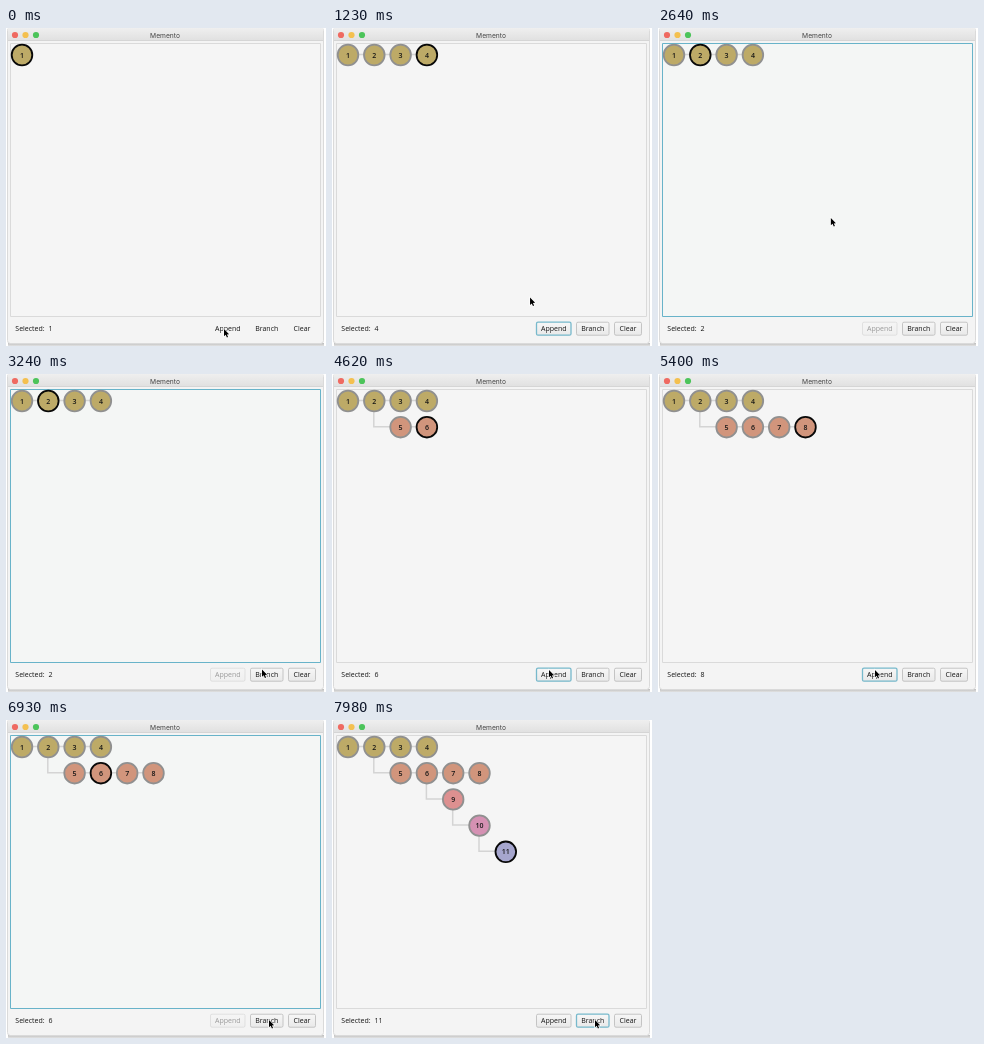
Animation of 320x318 px, one loop 8 s. Source, as an HTML page with a canvas:

```html
<!DOCTYPE html>
<html lang="en">
<head>
<meta charset="utf-8">
<title>Memento</title>
<style>
  html, body { margin: 0; width: 100%; height: 100%; overflow: hidden; background: #fff; }
  canvas { display: block; width: 320px; height: 318px; }
</style>
</head>
<body>
<canvas id="stage"></canvas>
<script>
const LOOP = 8000;
const canvas = document.getElementById('stage');
const ctx = canvas.getContext('2d');
const dpr = window.devicePixelRatio || 1;
canvas.width = 320 * dpr;
canvas.height = 318 * dpr;
ctx.scale(dpr, dpr);

const UI_FONT = '"Open Sans", "Noto Sans", sans-serif';
const ROW_COLORS = ['#bdaa67', '#d1957c', '#dd9090', '#d591b3', '#a6a6ce'];
const BUTTONS = { Append: [204.5, 34.5], Branch: [244.5, 32.5], Clear: [282.5, 27] };

// Each stop of the pointer; its clicks are spread evenly over the stay.
const STOPS = [
  { on: 'Append', x: 218, y: 301, arrive: 0, leave: 930, clicks: 3 },
  { on: 2, x: 42, y: 24, arrive: 1740, leave: 1980, clicks: 1 },
  { on: 'Branch', x: 256, y: 295.5, arrive: 3240, leave: 3630, clicks: 1 },
  { on: 'Append', x: 217, y: 296, arrive: 4200, leave: 5370, clicks: 3 },
  { on: 6, x: 94, y: 52, arrive: 5950, leave: 6180, clicks: 1 },
  { on: 'Branch', x: 263, y: 300, arrive: 6960, leave: LOOP, clicks: 3 }
];

const CLICKS = STOPS.flatMap(({ on, arrive, leave, clicks }) =>
  Array.from({ length: clicks }, (_, k) =>
    ({ on, time: arrive + (leave - arrive) * (k + 0.5) / clicks })));

const makeNode = (col, row, parent) =>
  ({ x: 16 + col * 26.3, y: 27 + row * 26.2, col, row, parent });

// Replays all clicks up to time t.
function stateAt(t) {
  const nodes = [makeNode(0, 0, null)];
  const state = { nodes, selected: nodes[0], focus: 'Append', clickTime: -LOOP };
  for (const { on, time } of CLICKS.filter(c => c.time <= t)) {
    const isNode = typeof on === 'number';
    if (isNode) {
      state.selected = nodes[on - 1];
    } else {
      const from = state.selected;
      const row = on === 'Branch' ? nodes.at(-1).row + 1 : from.row;
      nodes.push(state.selected = makeNode(from.col + 1, row, from));
    }
    state.focus = isNode ? 'pane' : on;
    state.clickTime = time;
  }
  return state;
}

const ease = u => u < 0.5 ? 16 * u ** 5 : 1 - 16 * (1 - u) ** 5;

function pointerAt(t) {
  const i = STOPS.findLastIndex(s => s.arrive <= t);
  const a = STOPS[i], b = STOPS[i + 1];
  if (t <= a.leave) return a;
  const k = ease((t - a.leave) / (b.arrive - a.leave));
  return { x: a.x + (b.x - a.x) * k, y: a.y + (b.y - a.y) * k };
}

function text(str, x, y, align = 'center', font = `7px ${UI_FONT}`, color = '#151515') {
  ctx.font = font;
  ctx.textAlign = align;
  ctx.fillStyle = color;
  ctx.fillText(str, x, y);
}

function outline(color, width = 1) {
  ctx.strokeStyle = color;
  ctx.lineWidth = width;
  ctx.stroke();
}

function disc(x, y, r, fill) {
  ctx.beginPath();
  ctx.arc(x, y, r, 0, 7);
  ctx.fillStyle = fill;
  ctx.fill();
}

function vertical(y0, y1, from, to) {
  const g = ctx.createLinearGradient(0, y0, 0, y1);
  g.addColorStop(0, from);
  g.addColorStop(1, to);
  return g;
}

function drawWindow(active) {
  ctx.fillStyle = '#fff';
  ctx.fillRect(0, 0, 320, 318);
  ctx.fillStyle = vertical(315, 318, '#bbb', '#e2e2e2');
  ctx.fillRect(2, 315, 316, 3);
  ctx.beginPath();
  ctx.roundRect(1.5, -0.5, 316, 316, 3);
  ctx.fillStyle = '#f4f4f4';
  ctx.fill();
  outline('#dadada');
  ctx.fillStyle = vertical(0, 12, '#efefef', '#e1e1e1');
  ctx.fillRect(2, 0, 315, 12);
  ctx.fillStyle = '#cecece';
  ctx.fillRect(2, 12, 315, 0.8);
  ['#ef6a61', '#f4c04f', '#4cc45a'].forEach((c, i) => disc(9 + i * 10.5, 7, 3.1, c));
  text('Memento', 159, 9.5, 'center', '6.7px Inter, sans-serif', '#444');

  ctx.beginPath();
  ctx.rect(4.5, 15.5, 310, 273);
  ctx.fillStyle = active ? '#f4f6f5' : '#f5f5f5';
  ctx.fill();
  outline(active ? '#68b3c9' : '#dadada');
}

function drawTree(nodes, selected) {
  for (const { x, y, parent } of nodes) {
    if (!parent) continue;
    ctx.beginPath();
    ctx.moveTo(parent.x - 0.5, parent.y);
    ctx.lineTo(parent.x - 0.5, y - 0.5);
    ctx.lineTo(x, y - 0.5);
    outline('#d4d4d4', 1.5);
  }
  nodes.forEach((n, i) => {
    disc(n.x, n.y, 10.3, ROW_COLORS[n.row]);
    outline(n === selected ? '#080808' : '#909090', 1.8);
    text(i + 1, n.x, n.y + 2.5, 'center', `600 7px ${UI_FONT}`);
  });
}

function drawButtons(t, { focus, clickTime }, canAppend) {
  for (const [label, [x, w]] of Object.entries(BUTTONS)) {
    const focused = label === focus;
    ctx.globalAlpha = label === 'Append' && !canAppend ? 0.4 : 1;
    if (t >= 30) {
      ctx.beginPath();
      ctx.roundRect(x, 294.2, w, 13, 1.5);
      ctx.fillStyle = focused && t - clickTime < 90 ? '#dedede' : vertical(294, 307, '#f7f7f7', '#e9e9e9');
      ctx.fill();
      outline(focused ? '#77b9cc' : '#c4c4c4', focused ? 1.3 : 1);
    }
    text(label, x + w / 2, 303.4);
  }
  ctx.globalAlpha = 1;
}

function polygon(x, y, points, fill) {
  ctx.beginPath();
  points.forEach(([dx, dy]) => ctx.lineTo(x + dx, y + dy));
  ctx.closePath();
  ctx.fillStyle = fill;
}

function drawArrow({ x, y }) {
  polygon(x, y, [[0, 0], [0, 7.3], [1.7, 5.8], [2.9, 8.5], [4.1, 8], [2.9, 5.4], [5.1, 5.2]], '#000');
  outline('#fff', 1.2);
  ctx.fill();
}

function drawHand({ x, y }) {
  polygon(x, y, [[0, 0], [1, 0], [2, 3], [6, 4.6], [4.8, 9.4], [1.8, 9.4], [-1.2, 5.8], [0.8, 6]], '#fff');
  ctx.fill();
  outline('#111', 0.9);
}

function draw(t) {
  const state = stateAt(t);
  const { nodes, selected, focus } = state;
  const pointer = pointerAt(t);
  const canAppend = !nodes.some(n => n.parent === selected);
  const overNode = nodes.some(n => Math.hypot(n.x - pointer.x, n.y - pointer.y) < 11.2);
  drawWindow(focus === 'pane');
  drawTree(nodes, selected);
  text('Selected:', 9.3, 303.4, 'left');
  text(nodes.indexOf(selected) + 1, 42.5, 303.4, 'left');
  drawButtons(t, state, canAppend);
  (overNode ? drawHand : drawArrow)(pointer);
}

const start = performance.now();
function tick() {
  draw((performance.now() - start) % LOOP);
  requestAnimationFrame(tick);
}
tick();
</script>
</body>
</html>
```
